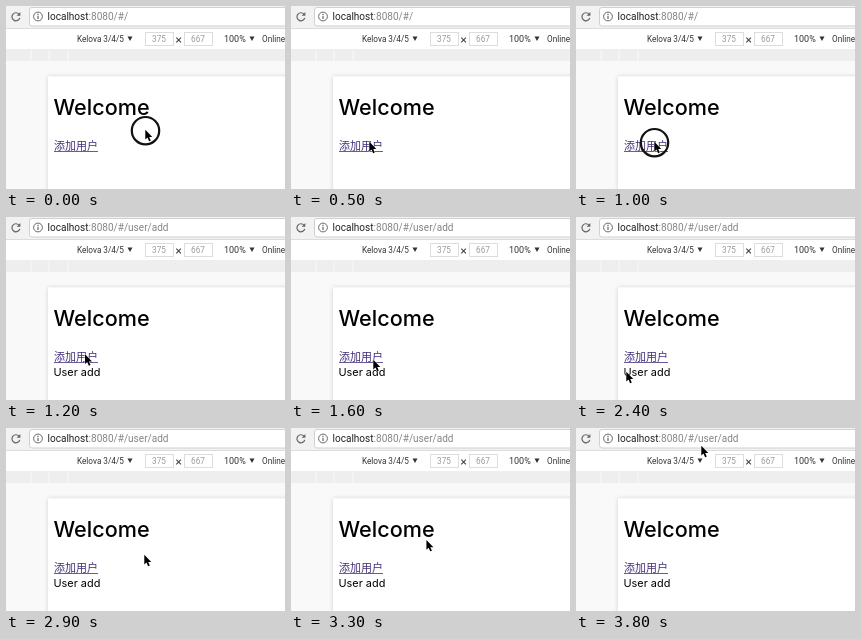
Animation, 279 px wide and 183 px high, one loop 3.9 s. Source, as an HTML page:

```html
<!DOCTYPE html>
<html lang="en">
<head>
<meta charset="utf-8">
<title>Route demo</title>
<style>
  html, body { margin: 0; width: 100%; height: 100%; overflow: hidden; background: #f9f9f9; }
  svg { display: block; width: 279px; height: 183px; }
  text { white-space: pre; }
  .url { font: 10.05px Roboto, sans-serif; fill: #858585; }
  .bar { font: 8.2px Roboto, sans-serif; fill: #333; }
  .bar .zoom { font-size: 9px; }
  .dim { fill: #999; text-anchor: middle; }
  .page { font: 10.9px Inter, sans-serif; }
  .title { font-size: 21.6px; font-weight: 500; }
  .link { font: 300 11px "Noto Sans CJK SC", "Noto Sans CJK", sans-serif; fill: #45307a; }
</style>
</head>
<body>
<svg viewBox="0 0 279 183">
  <defs>
    <filter id="shadow" x="-10%" y="-10%" width="120%" height="120%">
      <feDropShadow dx="0" dy="0" stdDeviation="2" flood-opacity=".16"/>
    </filter>
  </defs>

  <!-- Address bar -->
  <path fill="#f2f2f2" d="M0 0h279v22H0z"/>
  <rect x="23.5" y="1.5" width="270" height="18.5" rx="2.5" fill="#fff" stroke="#d0d0d0"/>
  <path d="M13 8.2A4 4 0 1 0 13.8 11.8" fill="none" stroke="#666" stroke-width="1.2"/>
  <path d="M14.4 6v3.8h-3.8z" fill="#666"/>
  <g fill="none" stroke="#666">
    <circle cx="32" cy="10.5" r="4.4"/>
    <path d="M32 9.8v3.2M32 7.7v1.2" stroke-width="1.2"/>
  </g>
  <text class="url" x="41.5" y="14"><tspan fill="#222">localhost</tspan>:8080/#/<tspan id="route"></tspan></text>

  <!-- Device bar -->
  <path fill="#fff" d="M0 22h279v21H0z"/>
  <path stroke="#dcdcdc" d="M0 22.5h279"/>
  <g class="bar">
    <text x="71" y="36">Kelova 3/4/5</text>
    <path d="M121.5 30.5h5l-2.5 4.5zM243.5 30.5h5l-2.5 4.5z"/>
    <g fill="#fff" stroke="#ddd">
      <rect x="139.5" y="26.5" width="28" height="13"/>
      <rect x="178.5" y="26.5" width="28" height="13"/>
    </g>
    <text class="dim" x="153" y="36">375</text>
    <path d="M170.3 31.7l4.6 4.6m0-4.6l-4.6 4.6" stroke="#444" stroke-width="1.1"/>
    <text class="dim" x="192" y="36">667</text>
    <text class="zoom" x="218" y="36">100%</text>
    <text x="256" y="36">Online</text>
  </g>

  <!-- Size ruler -->
  <path fill="#eee" d="M0 43h279v12H0z"/>
  <path stroke="#f9f9f9" d="M25 44v11M43 44v11M62 44v11"/>

  <!-- Page -->
  <rect x="42" y="70.5" width="260" height="130" fill="#fff" filter="url(#shadow)"/>
  <g class="page">
    <text class="title" x="47.5" y="109">Welcome</text>
    <text class="link" x="48" y="144">添加用户</text>
    <path stroke="#45307a" stroke-width=".8" d="M48 145.5h44"/>
    <text id="view" x="47.5" y="159">User add</text>
  </g>

  <g id="pointer">
    <circle id="press" cx=".5" cy="1.7" r="13.7" fill="none" stroke="#111" stroke-width="2.2"/>
    <path d="M.3.8v9.8l2.2-2 1.6 3.6 1.7-.7-1.6-3.5h3.1z" fill="#000" stroke="#fff" stroke-width=".8" paint-order="stroke"/>
  </g>
</svg>
<script>
  const LOOP = 3900, STEP = 100, OPENED = 1100;
  // Pointer path: time, x, y
  const path = [
    [0, 139, 123], [500, 78, 135], [1000, 78, 135], [1300, 79, 137],
    [1600, 82, 142], [2000, 90, 152], [2400, 50, 154], [2600, 62, 158],
    [2900, 138, 126], [3200, 137, 128], [3600, 125, 20], [3800, 125, 17], [LOOP, 125, 17]
  ];
  const el = id => document.getElementById(id);
  const ease = u => u * u * (3 - 2 * u);

  function pointerAt(t) {
    const i = path.findIndex(p => p[0] > t);
    const [t0, x0, y0] = path[i - 1], [t1, x1, y1] = path[i];
    const u = ease((t - t0) / (t1 - t0));
    return [x0 + (x1 - x0) * u, y0 + (y1 - y0) * u];
  }

  function draw(now) {
    const t = Math.floor(now % LOOP / STEP) * STEP;
    const opened = t >= OPENED;
    el("route").textContent = opened ? "user/add" : "";
    el("view").style.display = opened ? "" : "none";
    el("press").style.display = t === 0 || t === 1000 ? "" : "none";
    el("pointer").setAttribute("transform", `translate(${pointerAt(t)})`);
  }

  const start = performance.now();
  function tick() {
    draw(performance.now() - start);
    requestAnimationFrame(tick);
  }
  tick();
</script>
</body>
</html>
```
